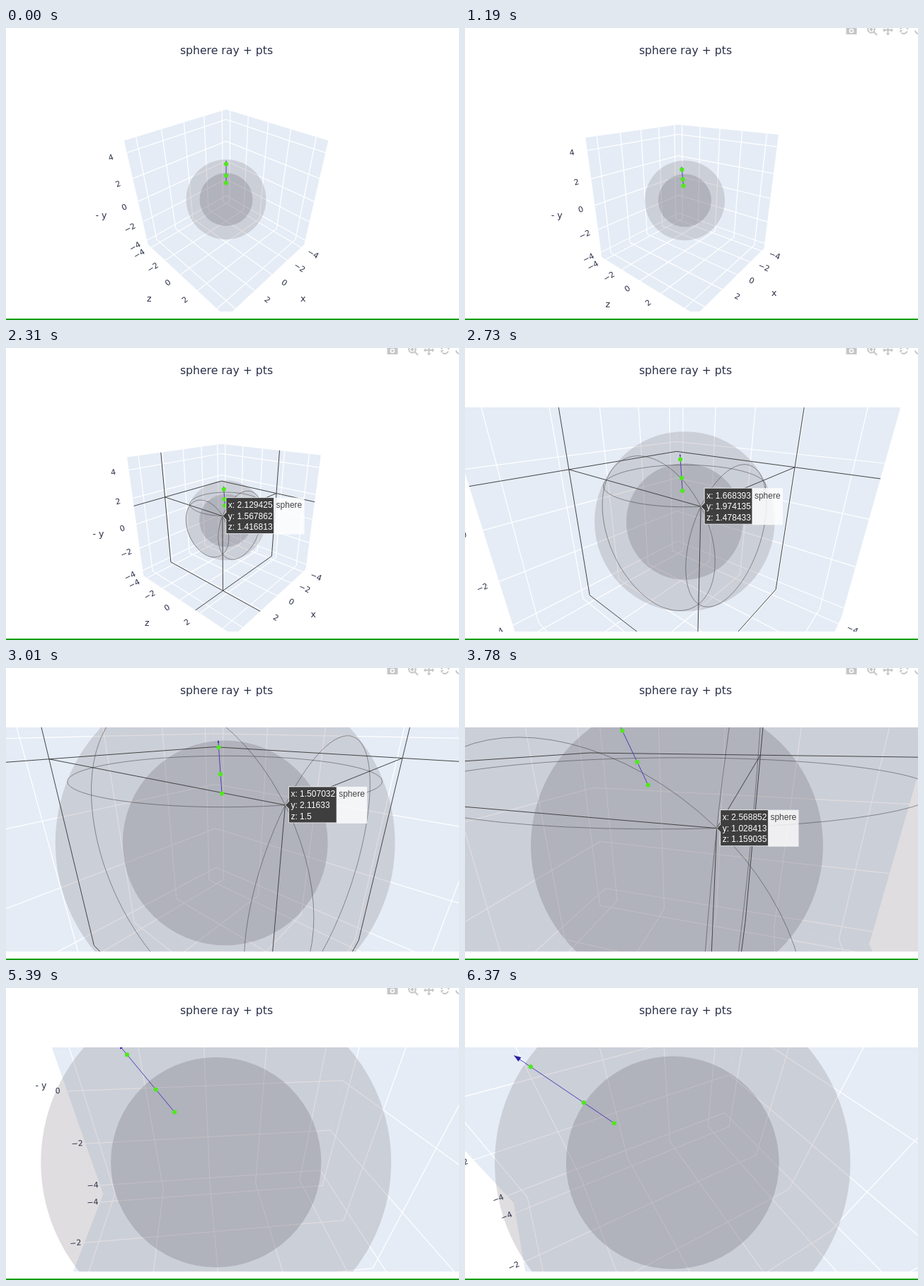
An HTML page with a canvas for the animation above (6.44 s loop, 640x413 px).

```html
<!DOCTYPE html>
<html lang="en">
<head>
<meta charset="utf-8">
<title>sphere ray + pts</title>
<style>
  html, body { margin: 0; width: 100%; height: 100%; overflow: hidden; background: #fff; }
  canvas { position: absolute; left: 0; top: 0; width: 640px; height: 413px; }
  h1 {
    position: absolute; left: 0; top: 22.4px; width: 623px; margin: 0;
    font: 15.7px/20px "DejaVu Sans", sans-serif; color: #2a3048; text-align: center;
  }
</style>
</head>
<body>
<canvas id="stage"></canvas>
<h1>sphere ray + pts</h1>
<script>
const LOOP = 6440, STEP = 70;
const SPAN = 9.34, SHIFT = 0.02, HALF = 0.5, NEAR = 0.01;
const VIEW = { x: 311, y: 242.5, top: 84, height: 317 };
const FOCAL = VIEW.height / 2 / Math.tan(Math.PI / 8);
const TICKS = [-4, -2, 0, 2, 4];
const INNER = 2, OUTER = 3;
const RAY = { start: 1.365, base: 3.19, tip: 3.29 };
const INK = "#2a3048", ICON = "#c6c6c8";

// Each move: start, end, then the values reached (azimuth, elevation, distance)
const FIRST_VIEW = [45, 35.26, 2.165];
const CAMERA_MOVES = [
  [910, 1190, 39.4, 22, 2.165],
  [1540, 1960, 41.1, 22.6, 2.165],
  [2310, 2940, 40.8, 22.5, 0.571],
  [3010, 3710, 16.2, 20, 0.421],
  [3850, 4410, 16.5, 20, 0.566],
  [4620, 6160, -29, 50, 0.565]
];

// Hovered spot on the outer sphere
const HOVER_FROM = 1960, HOVER_TO = 4060;
const FIRST_SPOT = [2.129425, 1.567862, 1.416813];
const SPOT_MOVES = [
  [2310, 2940, 1.507032, 2.11633, 1.5],
  [3010, 3710, 2.568852, 1.028413, 1.159035]
];

const stage = document.getElementById("stage");
const dpr = window.devicePixelRatio || 1;
stage.width = 640 * dpr;
stage.height = 413 * dpr;
const g = stage.getContext("2d");
g.scale(dpr, dpr);

let cam;

const clamp = u => Math.max(0, Math.min(1, u));
const ease = u => u * u * (3 - 2 * u);
const mix = (a, b, u) => a.map((v, i) => v + (b[i] - v) * u);
const dot = (a, b) => a[0] * b[0] + a[1] * b[1] + a[2] * b[2];

function follow(first, moves, t) {
  return moves.reduce((now, [from, to, ...goal]) =>
    mix(now, goal, ease(clamp((t - from) / (to - from)))), first);
}

function setCamera(t) {
  const [az, el, dist] = follow(FIRST_VIEW, CAMERA_MOVES, t);
  const a = az * Math.PI / 180, e = el * Math.PI / 180;
  const ca = Math.cos(a), sa = Math.sin(a), ce = Math.cos(e), se = Math.sin(e);
  cam = {
    right: [-sa, ca, 0],
    up: [-se * ca, -se * sa, ce],
    back: [ce * ca, ce * sa, se],
    side: [Math.sign(ca), Math.sign(sa), 1],
    dist
  };
}

const scale = v => v / SPAN - SHIFT;
const toBox = values => values.map(scale);
const onRay = r => toBox([-1, -1, 1].map(v => v * r / Math.sqrt(3)));
const toEye = p => [dot(p, cam.right), dot(p, cam.up), cam.dist - dot(p, cam.back)];
const toScreen = ([h, v, d]) => [VIEW.x + h * FOCAL / d, VIEW.y - v * FOCAL / d];
const project = p => toScreen(toEye(p));

// Point with a value on each of the numbered axes
function at(i, vi, j, vj, k, vk) {
  const p = [];
  p[i] = vi; p[j] = vj; p[k] = vk;
  return p;
}

// Path through 3D points, cut at the near plane
function trace(points, closed) {
  const eye = points.map(toEye), n = eye.length, out = [];
  eye.forEach((a, i) => {
    if (a[2] > NEAR) out.push(a);
    if (!closed && i === n - 1) return;
    const b = eye[(i + 1) % n];
    if ((a[2] > NEAR) !== (b[2] > NEAR)) out.push(mix(a, b, (NEAR - a[2]) / (b[2] - a[2])));
  });
  g.beginPath();
  out.forEach(p => g.lineTo(...toScreen(p)));
  if (closed) g.closePath();
}

function line(...points) {
  trace(points, false);
  g.stroke();
}

function disc(x, y, r, color) {
  g.fillStyle = color;
  g.beginPath();
  g.arc(x, y, r, 0, 7);
  g.fill();
}

function polygon(...points) {
  g.beginPath();
  points.forEach(p => g.lineTo(...p));
  g.closePath();
  g.fill();
}

// The three back walls: own axis, the two axes across it, and its position
const backWalls = () => [0, 1, 2].map(i => [i, (i + 1) % 3, (i + 2) % 3, -cam.side[i] * HALF]);

// Two lines crossing a wall at (u, v)
function cross([i, j, k, w], u, v) {
  line(at(i, w, j, u, k, -HALF), at(i, w, j, u, k, HALF));
  line(at(i, w, j, -HALF, k, v), at(i, w, j, HALF, k, v));
}

function drawWalls() {
  g.fillStyle = "#e5ecf6";
  for (const [i, j, k, w] of backWalls()) {
    const corners = [0, 1, 2, 3].map(n => {
      const q = (n + 0.5) * Math.PI / 2;
      return at(i, w, j, HALF * Math.sign(Math.cos(q)), k, HALF * Math.sign(Math.sin(q)));
    });
    trace(corners, true);
    g.fill();
  }
  g.strokeStyle = "#fff";
  g.lineWidth = 1.25;
  for (const wall of backWalls())
    for (const tick of TICKS) cross(wall, scale(tick), scale(tick));
}

function drawSphere(radius, color) {
  const eye = toEye(toBox([0, 0, 0])), r = radius / SPAN;
  disc(...toScreen(eye), FOCAL * r / Math.sqrt(eye[2] ** 2 - r * r), color);
}

function drawRay() {
  g.strokeStyle = "#4a40b4";
  g.lineWidth = 1;
  line(onRay(RAY.start), onRay(RAY.tip));
  const [bx, by] = project(onRay(RAY.base));
  const [tx, ty] = project(onRay(RAY.tip));
  const wx = (ty - by) * 0.36, wy = (bx - tx) * 0.36;
  g.fillStyle = "#2a1fa0";
  polygon([tx, ty], [bx + wx, by + wy], [bx - wx, by - wy]);
  for (const r of [RAY.start, INNER, OUTER]) disc(...project(onRay(r)), 3.1, "#4fe81e");
}

function axisText(text, anchor, axis, sign, pad, size, turned) {
  const p = anchor.slice();
  p[axis] += sign * pad * cam.dist / FIRST_VIEW[2];
  if (toEye(anchor)[2] < 0.1 || toEye(p)[2] < 0.1) return;
  const [x0, y0] = project(anchor), [x, y] = project(p);
  g.save();
  g.translate(x, y);
  if (turned) g.rotate(Math.atan((y - y0) / (x - x0)));
  g.font = size + 'px "DejaVu Sans", sans-serif';
  g.fillText(text, 0, 0);
  g.restore();
}

function drawAxes() {
  const [sx, sy] = cam.side;
  const a = [sx * HALF, -sy * HALF], b = [-sx * HALF, sy * HALF];
  const first = project([...a, 0])[0] < project([...b, 0])[0];
  const edge = first ? a : b;
  const axes = [
    ["x", v => [v, sy * HALF, -HALF], 1, sy],
    ["z", v => [sx * HALF, v, -HALF], 0, sx],
    ["- y", v => [...edge, v], first ? 0 : 1, first ? sx : sy]
  ];
  g.fillStyle = INK;
  g.textAlign = "center";
  g.textBaseline = "middle";
  for (const [name, place, axis, sign] of axes) {
    for (const tick of TICKS)
      axisText(String(tick).replace("-", "\u2212"), place(scale(tick)), axis, sign, 0.118, 11, true);
    axisText(name, place(0), axis, sign, 0.3, 12.5, false);
  }
}

function drawSpikes(spot) {
  const p = toBox(spot);
  for (const wall of backWalls()) {
    const [i, j, k, w] = wall;
    g.strokeStyle = "#444";
    g.lineWidth = 1;
    line(p, at(i, w, j, p[j], k, p[k]));
    cross(wall, p[j], p[k]);
    const r = Math.hypot(spot[j], spot[k]);
    const ring = Array.from({ length: 96 }, (_, n) => {
      const q = n * Math.PI / 48;
      return toBox(at(i, spot[i], j, r * Math.cos(q), k, r * Math.sin(q)));
    });
    g.strokeStyle = "rgba(50,50,50,.6)";
    g.lineWidth = 0.8;
    trace(ring, true);
    g.stroke();
  }
}

function drawLabel(spot) {
  const [x, y] = project(toBox(spot));
  const rows = spot.map((v, i) => "xyz"[i] + ": " + parseFloat(v.toFixed(6)));
  g.font = '12px "Liberation Sans", Arial, sans-serif';
  g.textAlign = "left";
  g.textBaseline = "alphabetic";
  const width = Math.max(...rows.map(s => g.measureText(s).width)) + 5;
  const left = x + 5, right = left + width, top = y - 26;
  g.fillStyle = "rgba(255,255,255,.8)";
  g.fillRect(right, top, 43, 52);
  g.fillStyle = "#3e3e3e";
  polygon([x, y], [left, y - 5], [left, top], [right, top], [right, top + 51], [left, top + 51], [left, y + 5]);
  g.strokeStyle = "#fff";
  g.lineWidth = 0.8;
  g.stroke();
  g.fillStyle = "#fff";
  rows.forEach((s, i) => g.fillText(s, left + 3, top + 14.5 + i * 15.6));
  g.fillStyle = "#444";
  g.fillText("sphere", right + 3, top + 14.5);
}

function arrowHead(x, y, dx, dy) {
  polygon([x + dx * 3, y + dy * 3], [x - dy * 3, y + dx * 3], [x + dy * 3, y - dx * 3]);
}

function drawToolbar(alpha) {
  g.save();
  g.globalAlpha = clamp(alpha);
  g.fillStyle = g.strokeStyle = ICON;
  g.lineWidth = 2;
  // camera
  g.fillRect(538.5, -1, 15, 10);
  disc(546, 4, 3.3, "#fff");
  disc(546, 4, 1.8, ICON);
  // magnifier, move cross, rotation arrows
  g.stroke(new Path2D("M578.8 2a4.8 4.8 0 1 1-9.6 0a4.8 4.8 0 1 1 9.6 0M578 6l4 4M571.5 2h5M574-.5v5"));
  g.stroke(new Path2D("M592 3h11M597.5 0v8"));
  g.stroke(new Path2D("M624.8 4.5a5 5 0 0 1-8.1 2.2M615.2 1.7a5 5 0 0 1 8-2.5M640.8 8a5 5 0 0 1-4.8-4.3"));
  arrowHead(593, 3, -1, 0);
  arrowHead(602, 3, 1, 0);
  arrowHead(597.5, 7.5, 0, 1);
  arrowHead(616.5, 5, -0.7, -0.7);
  arrowHead(624, 1, 0.7, -0.7);
  g.restore();
}

function draw(t) {
  const spot = t >= HOVER_FROM && t <= HOVER_TO && follow(FIRST_SPOT, SPOT_MOVES, t);
  setCamera(t);
  g.fillStyle = "#fff";
  g.fillRect(0, 0, 640, 413);

  g.save();
  g.beginPath();
  g.rect(0, VIEW.top, 640, VIEW.height);
  g.clip();
  drawWalls();
  drawSphere(OUTER, "rgba(118,112,120,.235)");
  drawSphere(INNER, "rgba(90,86,96,.24)");
  drawAxes();
  if (spot) drawSpikes(spot);
  drawRay();
  g.restore();

  if (spot) drawLabel(spot);
  drawToolbar(Math.min((t - 840) / 210, (6370 - t) / 210));
  g.fillStyle = "#0f9f0f";
  g.fillRect(0, 411, 640, 2);
}

const start = performance.now();
function tick() {
  const t = (performance.now() - start) % LOOP;
  draw(Math.floor(t / STEP) * STEP);
  requestAnimationFrame(tick);
}
tick();
</script>
</body>
</html>
```
